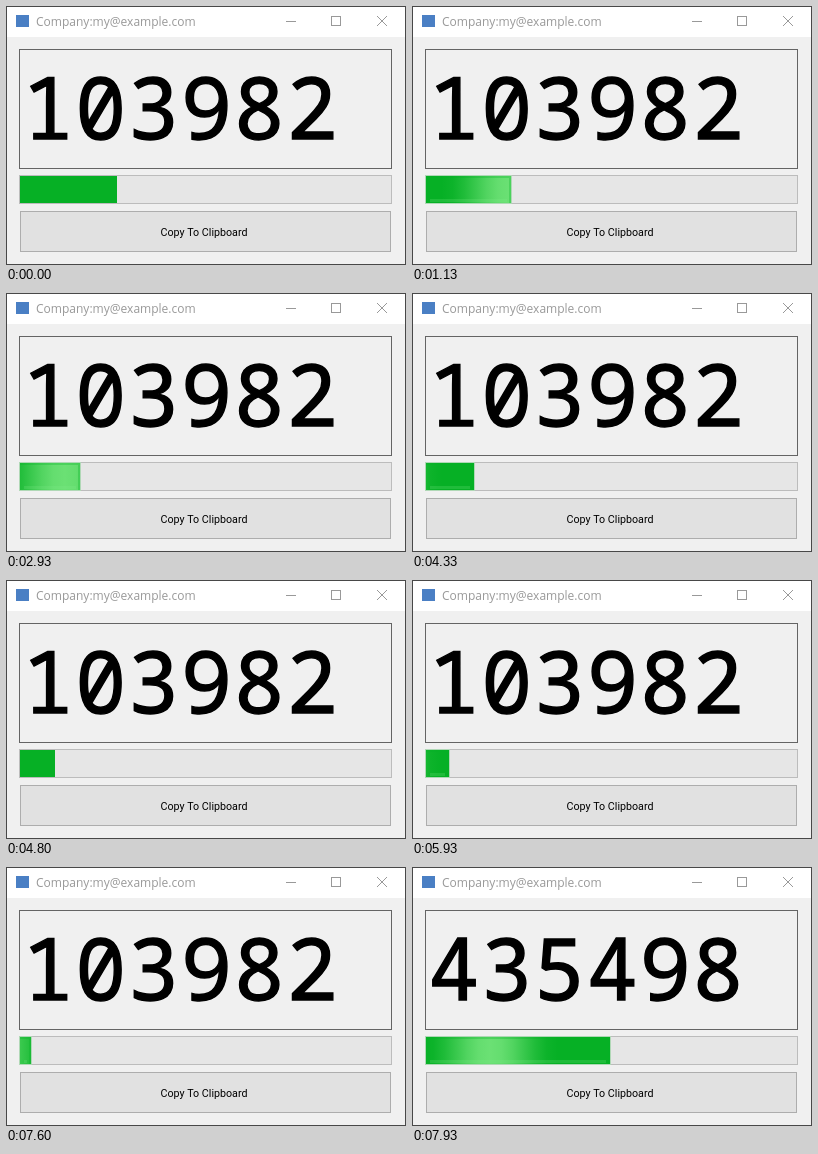
Write an HTML page with a canvas that moves like this. It is 400 px wide and 259 px high and loops after 8000 ms.

```html
<!DOCTYPE html>
<html lang="en">
<head>
<meta charset="utf-8">
<title>One-time code</title>
<style>
html, body { margin: 0; width: 100%; height: 100%; overflow: hidden; }
canvas { display: block; width: 400px; height: 259px; }
</style>
</head>
<body>
<canvas id="stage" width="400" height="259"></canvas>
<script>
const ctx = document.getElementById('stage').getContext('2d');
const LOOP = 8000;
const TICK = 200 / 3;

// All times below are in ticks.
const DROPS = [12, 27, 41, 56, 71, 86, 101];
const REFILL = 116;
const GLOWS = [[10, 23], [39, 48], [65, 72], [89, 97], [113, 121]];
const HOLDS = [[12, 17], [17, 19]];

const GLOW_SPEED = 0.29;
const GLOW_START = -38;
const GLOW_HALF = 68;
const DIGIT_PITCH = 52.8;

function box(x, y, w, h, fill, line) {
  ctx.fillStyle = fill;
  ctx.fillRect(x, y, w, h);
  if (!line) return;
  ctx.strokeStyle = line;
  ctx.lineWidth = 1;
  ctx.strokeRect(x + 0.5, y + 0.5, w - 1, h - 1);
}

function text(str, x, y, font, color, align = 'left') {
  ctx.font = font;
  ctx.fillStyle = color;
  ctx.textAlign = align;
  ctx.fillText(str, x, y);
}

function drawWindow() {
  box(0, 0, 400, 259, '#f0f0f0', '#484848');
  box(1, 1, 398, 30, '#ffffff');
  box(10, 9, 13, 12, '#4a7fc4');
  text('Company:my@example.com', 30, 20, '12px "Open Sans", "Noto Sans", sans-serif', '#999999');

  box(280, 15, 10, 1, '#999999');
  box(325, 10, 10, 10, '#ffffff', '#999999');
  ctx.beginPath();
  ctx.moveTo(371, 10);
  ctx.lineTo(381, 20);
  ctx.moveTo(381, 10);
  ctx.lineTo(371, 20);
  ctx.stroke();

  box(14, 205, 371, 41, '#e1e1e1', '#adadad');
  text('Copy To Clipboard', 198, 230, '10.7px Roboto, "Open Sans", sans-serif', '#000000', 'center');
}

function drawCode(tick) {
  box(13, 43, 373, 120, '#f0f0f0', '#646464');
  const code = tick < REFILL ? '103982' : '435498';
  ctx.strokeStyle = '#000000';
  ctx.lineWidth = 1.4;
  ctx.lineJoin = 'miter';
  [...code].forEach((digit, i) => {
    const x = 42 + i * DIGIT_PITCH;
    text(digit, x, 133.3, '85px "Noto Sans Mono", monospace', '#000000', 'center');
    ctx.strokeText(digit, x, 133.3);
  });
}

function barEdge(tick) {
  const seconds = tick < REFILL ? 8 - DROPS.filter(d => tick >= d).length : 15;
  return Math.floor(12.6 + 12.4 * seconds);
}

function drawGlow(center, edge) {
  const shade = ctx.createLinearGradient(center - GLOW_HALF, 0, center + GLOW_HALF, 0);
  for (let i = 0; i <= 12; i++) {
    const alpha = 0.7 * Math.sin(Math.PI * i / 12) ** 2;
    shade.addColorStop(i / 12, `rgba(150,245,150,${alpha.toFixed(3)})`);
  }
  const width = edge - 14;
  box(13, 169, width + 2, 29, '#06b025', '#b0d8b6');
  box(14, 170, width, 27, shade);
  // Soft rim: darker top and right, lighter foot.
  box(14, 170, width, 2, 'rgba(6,176,37,0.3)');
  box(edge - 2, 172, 2, 25, 'rgba(6,176,37,0.3)');
  box(18, 193, Math.max(0, width - 8), 3, 'rgba(130,235,140,0.2)');
}

function drawBar(tick) {
  box(13, 169, 373, 29, '#e6e6e6', '#bcbcbc');
  const edge = barEdge(tick);
  box(14, 170, edge - 14, 27, '#06b025');
  const pass = GLOWS.find(([from, to]) => tick >= from && tick < to);
  if (pass) drawGlow(GLOW_START + (tick - pass[0]) * TICK * GLOW_SPEED, edge);
}

function draw(time) {
  let tick = Math.floor((time % LOOP + 4) / TICK);
  const hold = HOLDS.find(([from, to]) => tick >= from && tick < to);
  if (hold) tick = hold[0];
  drawWindow();
  drawCode(tick);
  drawBar(tick);
}

const start = performance.now();
function frame() {
  draw(performance.now() - start);
  requestAnimationFrame(frame);
}
frame();
</script>
</body>
</html>
```
